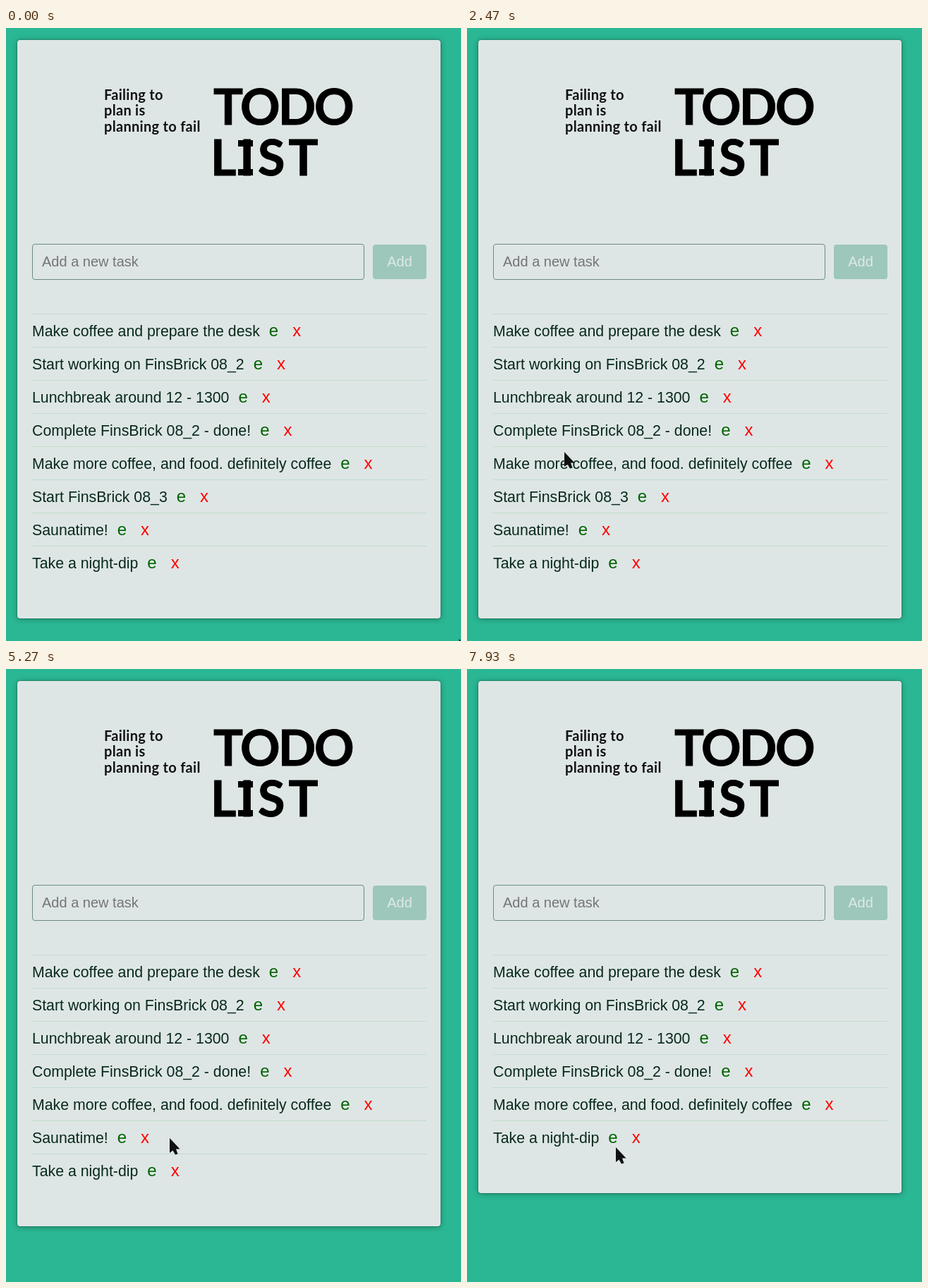
An HTML page for the animation above (8 s loop, 645x869 px).

```html
<!DOCTYPE html>
<html lang="en">
<head>
<meta charset="utf-8">
<title>Todo list</title>
<style>
html, body { margin: 0; width: 100%; height: 100%; overflow: hidden; background: #2ab793; }
body { position: relative; font: 21.3px "Liberation Sans", Arial, sans-serif; }
#card {
  position: absolute; left: 16px; top: 17px; width: 600px; padding: 388px 0 56px;
  background: #dee6e5; border-radius: 4px;
  box-shadow: 0 0 2px rgba(0, 0, 0, .5), 0 1px 8px rgba(0, 0, 0, .3);
}
#head { position: absolute; left: 0; top: 0; }
#field, #add { position: absolute; box-sizing: border-box; font-size: 20px; border-radius: 4px; }
#field {
  left: 21px; top: 289px; width: 471px; height: 51px; padding-left: 13px;
  line-height: 48px; border: 1px solid #6a8a84; color: #757575;
}
#add {
  left: 504px; top: 290px; width: 76px; height: 49px;
  line-height: 48px; text-align: center; background: #9dc7bb; color: #dee9e6;
}
.row {
  margin: 0 20px 0 21px; height: 46px; line-height: 46px; white-space: pre;
  border-top: 1px solid #c0dccb; color: #08291b;
}
.row:first-child { border-color: #c5d8d2; }
.row i { font-style: normal; font-size: 24px; padding: 0 7px; margin-left: 6px; color: #006400; }
.row i + i { color: #f00; }
#pointer { position: absolute; left: 0; top: 0; overflow: visible; pointer-events: none; fill: #111; }
</style>
</head>
<body>
<div id="card">
  <div id="list"></div>
  <div id="field">Add a new task</div>
  <div id="add">Add</div>
</div>
<svg id="head" width="645" height="280" font-family="Lato, sans-serif" font-weight="700">
  <g font-size="20" letter-spacing=".3" fill="#111">
    <text x="139" y="102">Failing to</text>
    <text x="139" y="124">plan is</text>
    <text x="139" y="147">planning to fail</text>
  </g>
  <g font-size="70" stroke="#000">
    <text x="294" y="137" letter-spacing="-2.4">TODO</text>
    <text x="290" y="209" letter-spacing="5">LIST</text>
  </g>
  <path d="M329 159h21v9h-21zM329 200h21v9h-21z"/>
</svg>
<svg id="pointer" width="1" height="1">
  <path id="arrow" d="M0 0V21L4.5 17.500 8 23.500 11.500 22.500 9 15.500H14.500Z"/>
  <path id="hand" d="M-2 1.500Q0-1 3 1.500V7L10 9Q11 9.500 11 11V16L9 19V23H-2V20L-7 14Q-8 10-5 10.500L-2 13Z"/>
</svg>
<script>
const LOOP = 8000, FPS = 15;
const tasks = [
  'Make coffee and prepare the desk', 'Start working on FinsBrick 08_2',
  'Lunchbreak around 12 - 1300', 'Complete FinsBrick 08_2 - done!',
  'Make more coffee, and food. definitely coffee', 'Start FinsBrick 08_3',
  'Saunatime!', 'Take a night-dip'
];
const removals = [[5, 4790], [6, 5730]];   // row, time

// turning points of the pointer: time, x, y
const stops = [
  [400, 642, 866], [870, 400, 340], [1270, 172, 700], [1730, 207, 766],
  [2130, 190, 640], [2530, 134, 598], [3000, 240, 618], [3330, 216, 677],
  [3870, 247, 667], [4470, 281, 664], [5200, 281, 664], [5270, 232, 665],
  [5600, 197, 664], [6070, 216, 688], [6730, 207, 664], [7400, 155, 303],
  [7800, 195, 708], [7930, 211, 678]
];

const $ = id => document.getElementById(id);
$('list').innerHTML = tasks.map(t => `<div class="row">${t}<i>e</i><i>x</i></div>`).join('');
const rows = $('list').children;

function pointerAt(time) {
  const t = Math.max(stops[0][0], Math.min(stops.at(-1)[0], time));
  const n = Math.max(1, stops.findIndex(s => s[0] >= t));
  const [t0, x0, y0] = stops[n - 1], [t1, x1, y1] = stops[n];
  const u = (t - t0) / (t1 - t0), k = u * u * (3 - 2 * u);
  return [Math.round(x0 + (x1 - x0) * k), Math.round(y0 + (y1 - y0) * k)];
}

function draw(now) {
  const t = Math.floor((now % LOOP + 4) * FPS / 1000) * 1000 / FPS % LOOP;
  for (const [row, time] of removals) rows[row].style.display = t < time ? '' : 'none';
  const [x, y] = pointerAt(t);
  const over = document.elementFromPoint(x, y)?.matches('i');
  $('pointer').style.transform = `translate(${x}px, ${y}px)`;
  $('hand').style.display = over ? '' : 'none';
  $('arrow').style.display = over ? 'none' : '';
}

const start = performance.now();
function tick() {
  draw(performance.now() - start);
  requestAnimationFrame(tick);
}
tick();
</script>
</body>
</html>
```
